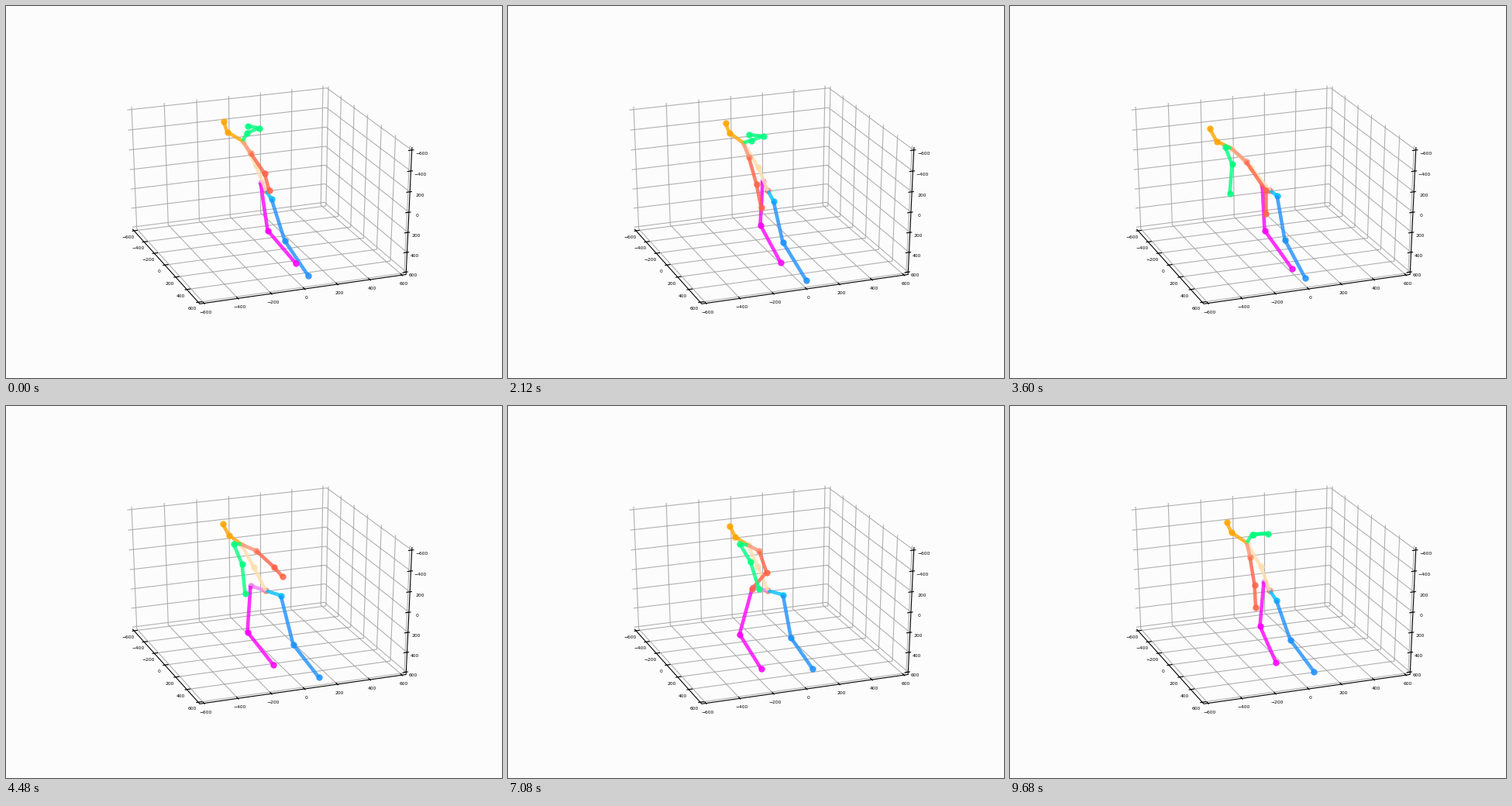
A matplotlib script for the animation above (9.72 s loop, 640 by 480 pixels).

```python
import numpy as np
import matplotlib.pyplot as plt
from matplotlib.animation import FuncAnimation

W, H, DPI = 640, 480, 100
FRAMES, STEP = 243, 40
PAPER = "#fcfcfc"
PT = 72 / DPI  # points per pixel

fig = plt.figure(figsize=(W / DPI, H / DPI), dpi=DPI, facecolor=PAPER)
ax = fig.add_axes([0, 0, 1, 1])
ax.set_xlim(-0.5, W - 0.5)
ax.set_ylim(H - 0.5, -0.5)
ax.axis("off")

# ---- the box: a perspective camera on a cube of +-600 units ----
AZIM, ELEV, ZSCALE = np.radians(20.5), np.radians(26.8), 0.864
EDGE = 625
TICKS = range(-600, 601, 200)


def project(x, y, z):
    x, y, z = x / 1200, y / 1200, z / 1200 * ZSCALE
    ca, sa, ce, se = np.cos(AZIM), np.sin(AZIM), np.cos(ELEV), np.sin(ELEV)
    right = ca * x + sa * y
    away = sa * x - ca * y
    up = se * away - ce * z
    depth = 10 + ce * away + se * z
    return 334.7 + 2681 * right / depth, 237.4 - 1998 * up / depth


def draw_paths(paths, color, zorder):
    xs, ys = [], []
    for path in paths:
        for point in path:
            px, py = project(*point)
            xs.append(px)
            ys.append(py)
        xs.append(np.nan)
        ys.append(np.nan)
    ax.plot(xs, ys, color=color, lw=0.8, zorder=zorder)


def label(x, y, text):
    ax.text(x, y, text, fontsize=6 * PT, family="DejaVu Sans",
            ha="center", va="center", color="black", zorder=2)


E = EDGE
grid, marks = [], []
for v in TICKS:
    grid.append([(v, -E, -E), (v, -E, E), (v, E, E)])
    grid.append([(E, v, -E), (E, v, E), (-E, v, E)])
    grid.append([(-E, -E, v), (E, -E, v), (E, E, v)])
    marks.append([(v, E - 20, E), (v, E + 10, E)])
    marks.append([(-E + 20, v, E), (-E - 10, v, E)])
    marks.append([(E - 20, E, v), (E + 10, E, v)])

    text = str(v).replace("-", "\u2212")
    px, py = project(v, E, E)
    label(px + 2.5, py + 11.5, text)
    px, py = project(-E, v, E)
    label(px - 7.8, py + 8.5, text)
    px, py = project(E, E, v)
    if v == -200:  # this label reads without its sign
        label(px + 13.5, py + 4.5, "200")
    else:
        label(px + 11 - v / 350, py + 4.5, text)

draw_paths(grid, "#b0b0b0", 0)
draw_paths(marks, "black", 1)
draw_paths([[(-E, -E, E), (-E, E, E), (E, E, E), (E, E, -E)]], "black", 1)

# ---- the figure: joints that pass through key poses ----
KEYS = [0, 2.12, 3.6, 4.48, 5.92, 8.36, 9.68]


def smooth(t, v, at):
    """Cubic curve through the points that never overshoots them."""
    h = np.diff(t)
    d = np.diff(v) / h
    a, b = d[:-1], d[1:]
    same = a * b > 0
    mid = np.zeros(len(a))
    mid[same] = 2 * a[same] * b[same] / (a[same] + b[same])
    m = np.concatenate([[d[0] / 2], mid, [d[-1] / 2]])
    i = np.clip(np.searchsorted(t, at, side="right") - 1, 0, len(h) - 1)
    s = (at - t[i]) / h[i]
    return ((1 + 2 * s) * (1 - s) ** 2 * v[i] + s * (1 - s) ** 2 * h[i] * m[i]
            + s * s * (3 - 2 * s) * v[i + 1] + s * s * (s - 1) * h[i] * m[i + 1])


times = np.arange(FRAMES) * STEP / 1000
tracks = {"root": np.tile([334.8, 237.8], (FRAMES, 1))}
bones = []


def joint(name, parent, color, poses, extra=()):
    """Add a joint, its bone to the parent and its path over the loop."""
    points = [(t, x, y) for t, (x, y) in zip(KEYS, poses)]
    t, x, y = np.array(sorted(points + list(extra)), float).T
    tracks[name] = np.column_stack([smooth(t, x, times), smooth(t, y, times)])
    z = 3 + len(bones) * 0.1
    line, = ax.plot([], [], color=color, lw=3.3, alpha=0.8, zorder=z,
                    solid_capstyle="butt")
    dot = add_dot(color, z + 0.05)
    bones.append((name, parent, line, dot))


def add_dot(color, z, alpha=0.88):
    return ax.plot([], [], "o", color=color, ms=8.4 * PT, mew=0,
                   alpha=alpha, zorder=z)[0]


root_dot = add_dot("tomato", 2.9, 0.7)
root_dot.set_data([334.8], [237.8])

joint("hip_a", "root", "deepskyblue",
      [(342, 248.5), (342, 251), (344, 244), (354, 244), (354, 243),
       (354.5, 243), (343, 250)])
joint("knee_a", "hip_a", "dodgerblue",
      [(359, 302), (354, 304), (354, 301), (370, 307), (364, 299),
       (365, 298), (361, 301)],
      [(0.56, 366, 305), (1.4, 365, 305), (2.72, 362, 304)])
joint("foot_a", "knee_a", "dodgerblue",
      [(389, 347), (384, 353), (380, 350), (403, 349.5), (393, 340),
       (392, 338), (391.5, 342)],
      [(0.56, 400, 353), (1.4, 399, 353), (2.72, 394, 352)])

joint("hip_b", "root", "violet",
      [(328, 227.5), (328, 225), (325, 231), (315, 231.5), (315, 233),
       (315, 233), (327, 226)])
joint("knee_b", "hip_b", "magenta",
      [(337, 289), (325, 282), (328, 289), (311, 291), (299, 294),
       (298, 294), (322, 283.5)],
      [(1.0, 329, 286)])
joint("foot_b", "knee_b", "magenta",
      [(373, 331), (351, 330), (363, 338), (344, 333), (327, 339),
       (326, 338), (342.5, 330)],
      [(1.0, 359, 333)])

joint("spine", "root", "navajowhite",
      [(322, 205), (322, 207), (310.5, 208), (319, 207), (321, 206),
       (322, 206), (323, 206.5)])
joint("chest", "spine", "navajowhite",
      [(305, 174), (303, 176), (285, 183), (303, 178), (309, 180),
       (309, 177), (305, 176)],
      [(1.0, 302, 175)])
joint("neck", "chest", "orange",
      [(285, 162), (285, 163), (266, 174), (287, 166), (292, 170),
       (293, 165.5), (285, 162.5)],
      [(1.0, 282, 162)])
joint("head", "neck", "orange",
      [(280, 148.5), (280, 150), (257, 157.5), (279, 151.5), (284, 156),
       (286.5, 151), (279, 149.5)],
      [(1.0, 276, 148), (3.0, 272.5, 152)])

joint("shoulder_b", "chest", "#fb9274",
      [(315, 189), (310, 194), (304, 200), (322, 186), (324, 188),
       (323, 185.5), (309, 194)])
joint("elbow_b", "shoulder_b", "tomato",
      [(333, 215.5), (320, 229), (329, 237), (345, 207), (334, 216),
       (332, 212), (315, 230.5)])
joint("hand_b", "elbow_b", "tomato",
      [(339, 237), (326, 259), (329, 267.5), (356, 219.5), (326.5, 238.5),
       (308.5, 231), (316.5, 259.5)])

joint("shoulder_a", "chest", "springgreen",
      [(310, 163.5), (313, 173), (277, 181), (293, 177), (298, 178),
       (299.5, 176), (312, 165)])
joint("elbow_a", "shoulder_a", "springgreen",
      [(326, 157), (329, 167.5), (286, 203.5), (304, 203.5), (309, 200),
       (316.5, 200), (332.5, 164)],
      [(0.56, 326, 152), (1.4, 327, 153)])
joint("hand_a", "elbow_a", "springgreen",
      [(311, 154), (310, 165.5), (283, 241.5), (308, 241.5), (320, 235.5),
       (325, 236), (313, 165)],
      [(0.56, 312, 136), (1.4, 314, 135)])


def update(i):
    for name, parent, line, dot in bones:
        (x0, y0), (x1, y1) = tracks[parent][i], tracks[name][i]
        line.set_data([x0, x1], [y0, y1])
        dot.set_data([x1], [y1])
    return [part for bone in bones for part in bone[2:]]


anim = FuncAnimation(fig, update, frames=FRAMES, interval=STEP,
                     repeat=True, repeat_delay=0)
plt.show()
```
